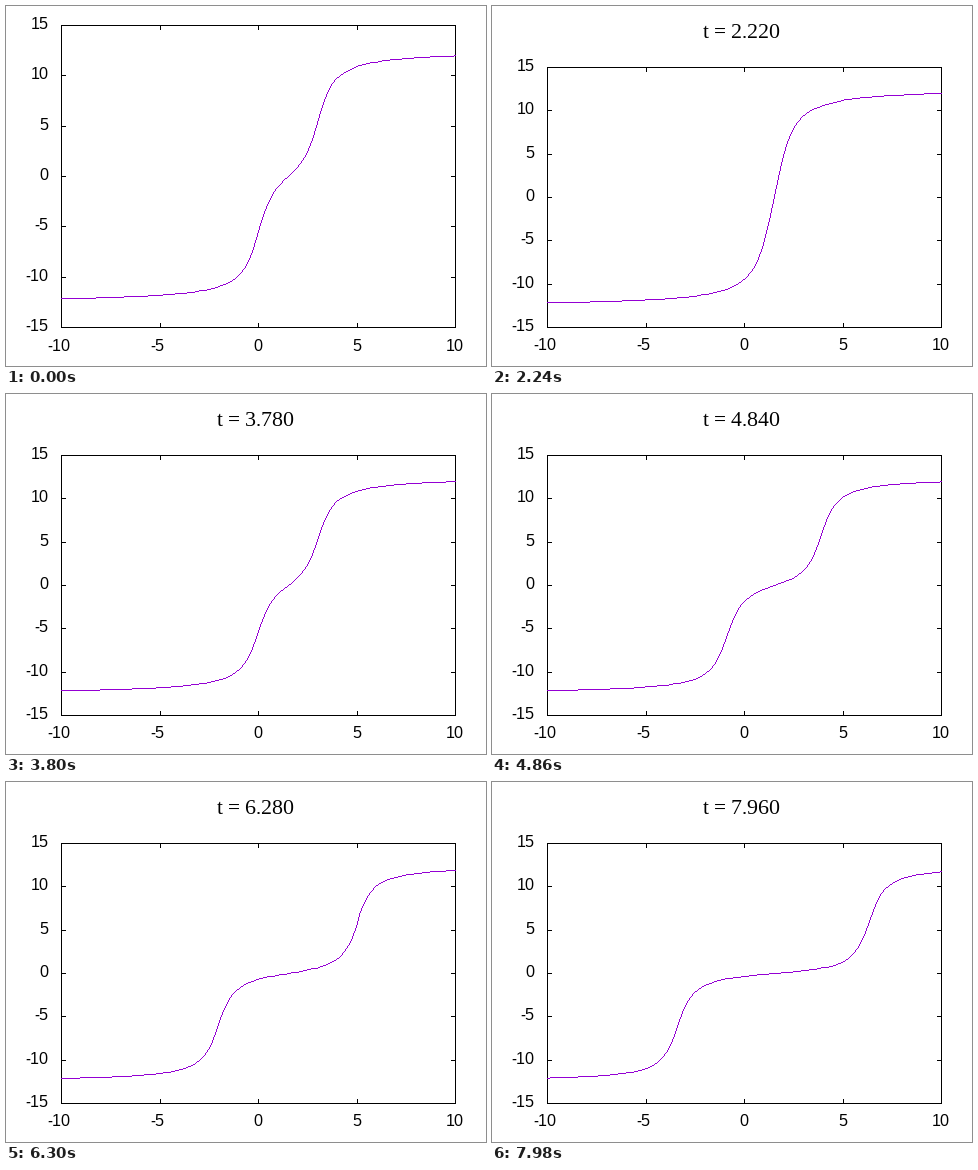
A matplotlib script for the animation above (8 s loop, 480 by 360 pixels).

```python
import numpy as np
import matplotlib.pyplot as plt
from matplotlib.animation import FuncAnimation
from matplotlib.patches import Rectangle

plt.rcParams["text.hinting"] = "default"
plt.rcParams["text.hinting_factor"] = 1

W, H, DPI = 480, 360, 100
PX = 72 / DPI                      # one pixel in points
LEFT, RIGHT, BOTTOM = 55, 449, 321
STEP = 0.02
FRAMES = 400
TICK = 5                           # tick length, frame line included

START, SPEED = 1.5, 0.8            # half distance at t = 0, speed of each kink
CENTRE = 1.5
WIDTH = np.sqrt(1 - SPEED ** 2)

fig = plt.figure(figsize=(W / DPI, H / DPI), dpi=DPI, facecolor="white")
ax = fig.add_axes([0, 0, 1, 1])
ax.set_xlim(0, W)
ax.set_ylim(H, 0)
ax.axis("off")


def to_px(v):
    return np.floor(np.asarray(v) + 0.5).astype(int)


def x_px(x):
    return to_px(LEFT + (RIGHT - LEFT) * (x + 10) / 20)


def y_px(y, top):
    return to_px(BOTTOM - (BOTTOM - top) * (y + 15) / 30)


def kinks(x, t):
    """Two arctan kinks that pass through each other."""
    gap = START - SPEED * t
    u = x - CENTRE
    return 4 * (np.arctan((u - gap) / WIDTH) + np.arctan((u + gap) / WIDTH))


def trace(px, py):
    """Pixels of a thin stepped line through the given points."""
    xs, ys = [], []
    for x0, y0, x1, y1 in zip(px[:-1], py[:-1], px[1:], py[1:]):
        n = max(abs(x1 - x0), abs(y1 - y0), 1)
        xs.append(to_px(np.linspace(x0, x1, n + 1)))
        ys.append(to_px(np.linspace(y0, y1, n + 1)))
    # offsets keep the pixel markers clear of rounding edges
    return np.concatenate(xs) + 0.25, np.concatenate(ys) + 0.75


def bar(x, y, w, h):
    return ax.add_patch(Rectangle((x, y), w, h, fc="black", lw=0,
                                  antialiased=False))


def label(x, y, s, ha):
    return ax.text(x, y, s, ha=ha, va="baseline", color="black",
                   family="Liberation Sans", size=16 * PX)


def make_frame(top, label_base):
    parts = [bar(LEFT, y, RIGHT - LEFT + 1, 1) for y in (top, BOTTOM)]
    parts += [bar(x, top, 1, BOTTOM - top + 1) for x in (LEFT, RIGHT)]
    for v in range(-10, 11, 5):
        x = x_px(v)
        parts.append(bar(x, top, 1, TICK))
        parts.append(bar(x, BOTTOM + 1 - TICK, 1, TICK))
        sign = 2.5 if v < 0 else 0     # the minus hangs to the left
        parts.append(label(x - sign, label_base, str(v), "center"))
    for v in range(-15, 16, 5):
        y = y_px(v, top)
        parts.append(bar(LEFT, y, TICK, 1))
        parts.append(bar(RIGHT + 1 - TICK, y, TICK, 1))
        parts.append(label(42.5, y + 4, str(v), "right"))
    return parts


tall = make_frame(19, 345)
short = make_frame(61, 344)
title = ax.text(249.5, 32, "", ha="center", va="baseline", color="black",
                family="Liberation Serif", size=21.33 * PX)
curve, = ax.plot([], [], ",", color="#9400d3", zorder=3)

samples = np.linspace(-10, 10, 100)
sample_px = x_px(samples)


def draw(i):
    first = i == 0
    t = max(i - 1, 0) * STEP
    for part in tall:
        part.set_visible(first)
    for part in short:
        part.set_visible(not first)
    title.set_text("" if first else f"t = {t:.3f}")
    top = 19 if first else 61
    curve.set_data(*trace(sample_px, y_px(kinks(samples, t), top)))
    return [curve, title]


anim = FuncAnimation(fig, draw, frames=FRAMES, interval=20,
                     repeat=True, repeat_delay=0, blit=False)
plt.show()
```
